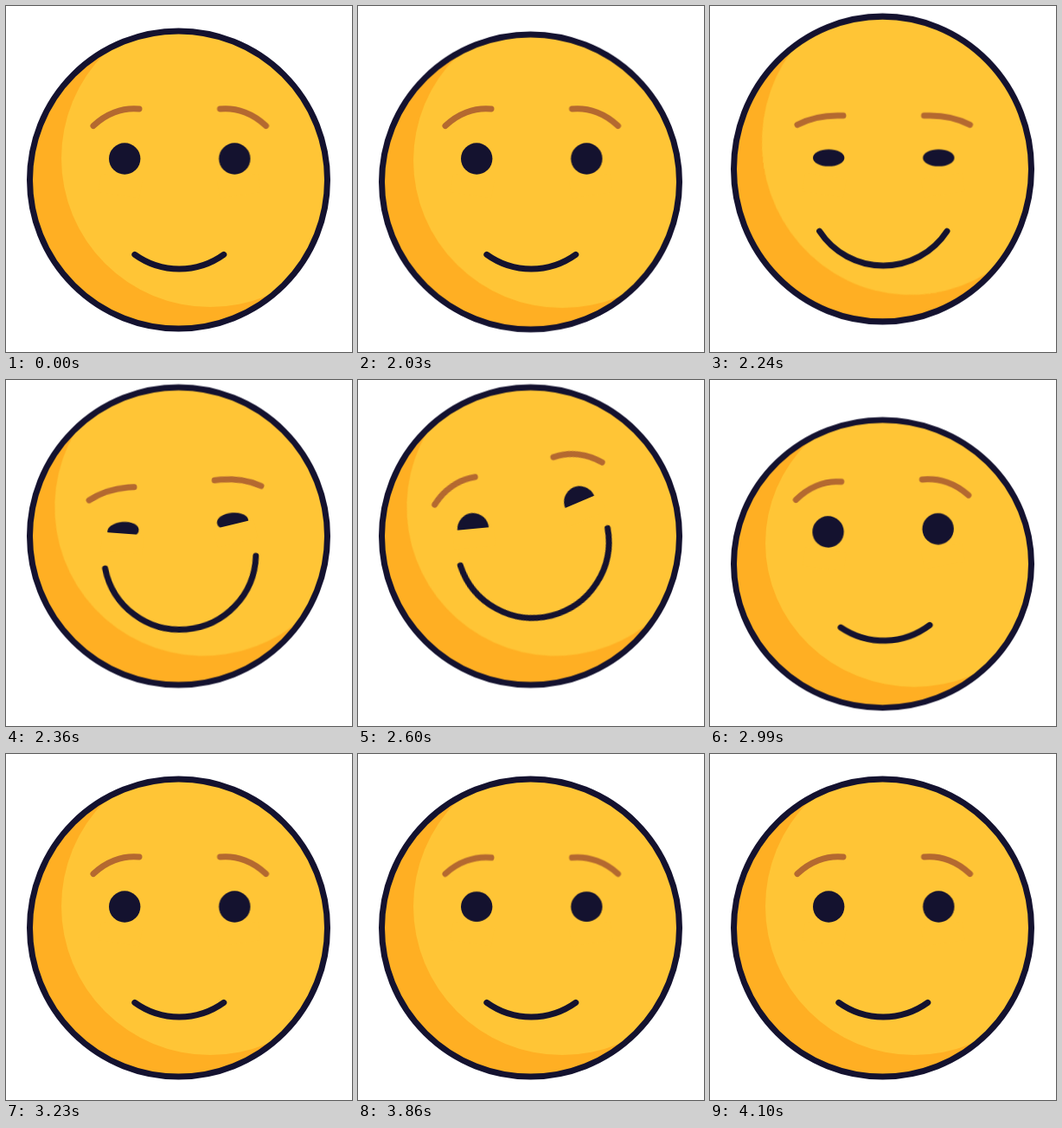
Animation of 400 by 400 pixels, one loop 5.09 s. Source, as an HTML page without scripts:

```html
<!DOCTYPE html>
<html lang="en">
<head>
<meta charset="utf-8">
<title>Smiling face</title>
<style>
html, body { margin: 0; width: 100%; height: 100%; overflow: hidden; background: #fff; }
svg { display: block; width: 100vw; height: 100vh; }

.body, .shine, .face, .mouth, .arc, .eye, .brow, .lid {
  animation: 5090ms ease-in-out infinite;
}
.body, .shine, .face { transform-origin: 199.5px 201px; }
.body { animation-name: hop; }
.shine { animation-name: roll; }
.face { animation-name: tilt; }
.mouth { animation-name: lift; }
.arc { animation-name: grin; }
.eye, .brow { animation-name: blink; }
.eye { transform-origin: 137.2px 176.5px; fill: #14122f; }
.brow { transform-origin: 101px 138px; stroke: #b46930; vector-effect: non-scaling-stroke; }
.lid { animation-name: squint; fill: #ffc536; }
.line { fill: none; stroke-width: 7; stroke-linecap: round; }

@keyframes hop {
  0%, 39.6% { transform: none; animation-timing-function: linear; }
  39.88% { transform: translateY(2px) scaleY(.992); animation-timing-function: ease-out; }
  41.55% { transform: translateY(17px) scaleY(.95); animation-timing-function: ease-in; }
  43.03% { transform: translateY(0) scaleY(1.045); animation-timing-function: linear; }
  44.01% { transform: translateY(-12.5px) scaleY(1.026); animation-timing-function: ease-out; }
  46.37%, 51.08% { transform: translateY(-20.5px); animation-timing-function: ease-in; }
  54.42% { transform: translateY(-16px) scaleY(1.03); animation-timing-function: linear; }
  55.8% { transform: translateY(-6.5px) scaleY(1.045); animation-timing-function: ease-out; }
  57.37% { transform: translateY(17px) scaleY(.95); }
  61.1% { transform: translateY(-1.5px) scaleY(1.01); }
  63.46%, 100% { transform: none; }
}
@keyframes roll {
  0%, 41.85% { transform: rotate(0deg); animation-timing-function: ease-in; }
  44.01% { transform: rotate(-8.3deg); animation-timing-function: ease-out; }
  46.37%, 50.9% { transform: rotate(-15deg); }
  55.8%, 100% { transform: rotate(0deg); }
}
@keyframes tilt {
  0%, 43.03% { transform: translateY(0) rotate(0deg); }
  44.01% { transform: translateY(-1px) rotate(0deg); }
  49.9%, 51.08% { transform: translateY(-20.5px) rotate(-14.2deg); animation-timing-function: ease-in; }
  55.8% { transform: translateY(-14px) rotate(-8.1deg); animation-timing-function: ease-out; }
  60.51%, 100% { transform: translateY(0) rotate(0deg); }
}
@keyframes lift {
  0%, 41.85% { transform: translateY(0); }
  47.15%, 51.08% { transform: translateY(-8px); }
  56.58%, 100% { transform: translateY(0); }
}
@keyframes grin {
  0%, 41.55% { stroke-dasharray: 71.6 400; stroke-dashoffset: -54.2; animation-timing-function: ease-in; }
  44.01% { stroke-dasharray: 113.2 400; stroke-dashoffset: -33.4; animation-timing-function: ease-out; }
  47.15%, 51.08% { stroke-dasharray: 172 400; stroke-dashoffset: -4; }
  55.8% { stroke-dasharray: 76 400; stroke-dashoffset: -52; }
  57.37%, 100% { stroke-dasharray: 71.6 400; stroke-dashoffset: -54.2; }
}
@keyframes blink {
  0%, 42.83% { transform: scaleY(1); }
  45.19% { transform: scaleY(.1); }
  47.54%, 51.96% { transform: scaleY(1); }
  54.22% { transform: scaleY(.1); }
  56.9%, 75.44% { transform: scaleY(1); }
  78.19% { transform: scaleY(.1); }
  80.55%, 100% { transform: scaleY(1); }
}
@keyframes squint {
  0%, 44.4% { transform: translateY(21px); }
  47.15%, 51.08% { transform: translateY(0); }
  55.8% { transform: translateY(11px); }
  57.37%, 100% { transform: translateY(21px); }
}
</style>
</head>
<body>
<svg viewBox="0 0 400 400">
  <clipPath id="disc"><circle cx="199.5" cy="201" r="172"/></clipPath>

  <g class="body">
    <circle cx="199.5" cy="201" r="172" fill="#ffaf23"/>
    <g clip-path="url(#disc)">
      <circle class="shine" cx="236" cy="176" r="172" fill="#ffc536"/>
    </g>
    <circle cx="199.5" cy="201" r="172" fill="none" stroke="#14122f" stroke-width="7"/>
  </g>

  <g class="face">
    <g>
      <circle class="eye" cx="137.2" cy="176.5" r="18.2"/>
      <g transform="translate(137.2 176.5) rotate(9)">
        <rect class="lid" x="-24" width="48" height="22"/>
      </g>
      <path class="brow line" d="M101 138.5C115 125 134 117 154 119"/>
    </g>
    <g transform="translate(401.5) scale(-1 1)">
      <circle class="eye" cx="137.2" cy="176.5" r="18.2"/>
      <g transform="translate(137.2 176.5) rotate(9)">
        <rect class="lid" x="-24" width="48" height="22"/>
      </g>
      <path class="brow line" d="M101 138.5C115 125 134 117 154 119"/>
    </g>
    <g class="mouth">
      <path class="arc line" d="M112.3 216a88 88 0 0 0 176 0" pathLength="180" stroke="#14122f"/>
    </g>
  </g>
</svg>
</body>
</html>
```
